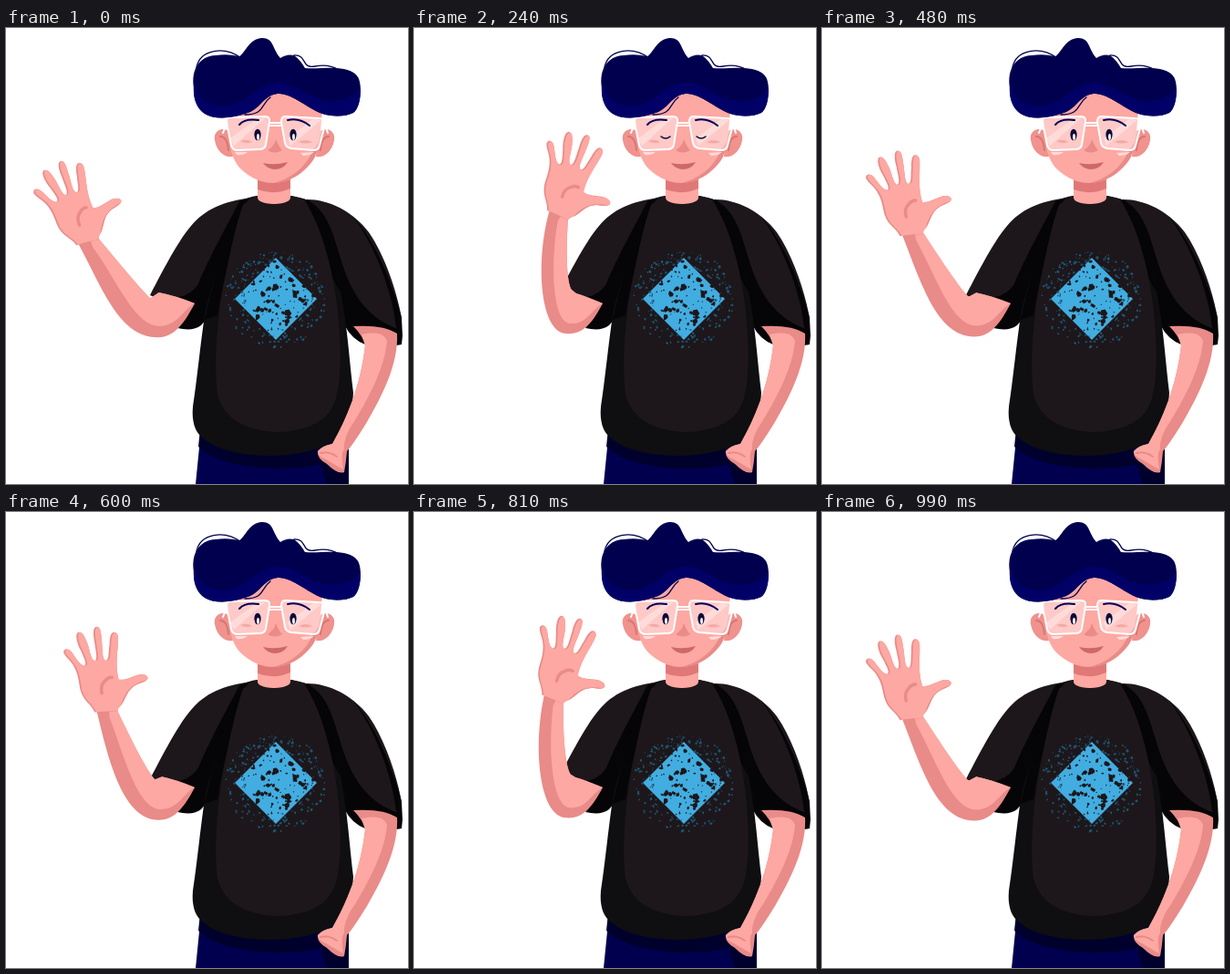
Animation of 441x500 px, one loop 1.02 s. Source, as an HTML page:

```html
<!DOCTYPE html>
<html lang="en">
<head>
<meta charset="utf-8">
<title>Waving</title>
<style>
html, body { margin: 0; width: 100%; height: 100%; overflow: hidden; background: #fff; }
svg { display: block; width: 100vw; height: 100vh; }
.skin { fill: #fda8a2; }
.shade { fill: #e98b88; }
.cloth { fill: #1d171b; }
.dark { fill: #0f0e11; }
.black { fill: #050407; }
.navy { fill: #00004f; }
.line { fill: none; stroke-linecap: round; stroke-linejoin: round; }
</style>
</head>
<body>
<svg viewBox="0 0 441 500">
<defs>
  <path id="palm" d="M108 214C105 204 97 201 95 188C94 178 95 171 90 160C87 154 82 150 81 145
    C82 140 87 141 90 146C94 153 97 161 102 162C106 161 102 152 100 145C97 138 95 127 99 125
    C104 124 106 131 108 138C110 146 110 157 114 158C118 157 116 146 116 138C115 128 116 121 120 121
    C125 121 124 131 124 138C124 146 122 157 126 159C130 159 130 149 132 142C133 134 135 128 139 129
    C144 131 142 138 141 144C139 155 136 167 138 181C146 183 153 179 161 178C167 178 170 180 170 183
    C168 187 161 187 156 189C146 193 144 202 138 209Q133 213 133 216Q121 214 108 214Z"/>
  <clipPath id="palmClip"><use href="#palm"/></clipPath>
</defs>

<!-- trousers -->
<path class="navy" d="M214 440L208 500H376V440Z"/>
<path fill="#00002c" d="M213 440L211 459Q232 480 290 483Q325 484 345 478L352 500H376V440Z"/>

<!-- shirt -->
<path class="cloth" d="M270 186C238 190 218 199 203 217C190 232 175 260 158 293Q166 297 190 306L216 322L262 215Z"/>
<path class="black" d="M270 186L256 190C246 210 225 247 212 278Q206 292 186 296L207 303L188 329Q205 333 214 326L236 300L262 215Z"/>
<path class="cloth" d="M328 188C352 187 380 200 398 224C416 250 429 290 434 318V346Q426 350 414 343Q395 327 371 324L350 240Z"/>
<path class="black" d="M328 188C350 196 358 222 365 246C375 281 389 315 430 330L435 337L434 347Q424 350 412 341L396 348Q379 342 371 325L350 240Z"/>
<path class="black" d="M380 206C405 232 425 283 434 318L435 338L428 328C424 290 405 238 380 206Z"/>
<path class="dark" d="M257 190Q267 185 275 184L313 184Q326 186 333 190C347 212 360 248 367 288C375 330 377 370 381 400Q380 435 356 455Q330 469 288 469Q235 468 214 448Q203 438 205 415C210 383 213 347 219 308C231 266 244 215 257 190Z"/>
<path class="black" d="M257 190L266 187C252 230 238 270 232 315L218 320C231 265 241 218 257 190ZM326 187L334 190C351 215 361 255 367 290L357 272C349 236 341 211 326 187Z"/>
<path class="cloth" d="M266 189L275 184H313L327 188C346 217 359 265 364 310C368 350 368 385 362 406Q352 442 296 443Q242 440 232 402C228 370 231 330 237 291C244 255 251 219 260 194Z"/>
<g id="print"><path fill="#42ade0" d="M296 252L341 297L296 342L251 297Z"/></g>

<!-- neck, ears, face -->
<path class="skin" d="M276 160H312V185Q313 192 294 193Q275 192 276 185Z"/>
<path fill="#df7876" d="M276 162H312V176Q294 184 276 177Z"/>
<path fill="#f0928e" d="M246 114C237 107 227 113 229 123C231 135 240 143 249 141ZM343 114C352 107 362 113 360 123C358 135 349 143 340 141Z"/>
<path class="line" stroke="#d97572" stroke-width="2" d="M235 119Q243 119 244 134M354 119Q346 119 345 134"/>
<path class="skin" d="M243 90C243 124 246 142 257 154Q274 170 293 170Q314 169 329 154C342 140 345 120 347 90L296 66Z"/>
<path class="shade" d="M344 124C341 139 338 146 329 154Q314 169 293 170C318 164 331 148 338 132Z"/>
<path class="shade" d="M296 122Q299 130 303 134Q295 139 287 134Q294 130 296 122Z"/>
<path fill="#cd6868" d="M282 148Q295 151 309 147Q304 155 295 155Q287 155 282 148Z"/>

<!-- glasses -->
<g class="line" stroke="#fff" stroke-width="2">
  <path fill="#fff" fill-opacity=".38" d="M246 98L284 97Q290 97 289 103L285 128Q284 133 278 133L254 134Q248 134 247 128L242 104Q241 98 246 98ZM306 97L343 99Q351 99 350 106L344 129Q343 134 337 134L313 132Q307 131 306 126L302 103Q302 97 306 97Z"/>
  <path d="M289 104H302M289 107H302M242 105L238 115M350 106L353 115"/>
</g>
<path fill="#fff" opacity=".35" d="M246 121L275 100L284 99L250 129ZM309 121L337 100L346 101L312 129Z"/>
<path fill="#fff" opacity=".6" d="M251 136H265Q260 140 253 139ZM323 137L338 136Q334 140 326 140Z"/>
<path class="shade" opacity=".5" d="M257 124Q264 121 270 125Q264 128 257 124ZM321 125Q328 121 336 125Q328 128 321 125Z"/>

<!-- eyes and brows -->
<g id="open"></g>
<path id="closed" class="line" stroke="#0b0a3a" stroke-width="1.5" d="M271 119Q276 123 281 119M310 119Q315 123 320 119"/>
<path class="line" stroke="#00005a" stroke-width="2" d="M256 106Q262 99 277 101M309 101Q322 98 333 107"/>

<!-- hair -->
<path class="navy" d="M206 65C203 47 211 31 230 30Q243 28 256 31C263 27 266 12 281 11C294 11 292 23 301 33Q308 28 316 30Q323 35 328 44C344 45 356 42 371 45Q386 48 388 59C391 73 387 88 381 93C371 98 356 97 347 94C329 87 313 71 298 72C282 74 279 89 265 93C249 99 229 101 218 94Q205 85 206 65Z"/>
<path fill="#000067" d="M206 60C213 85 234 90 252 83C271 76 277 61 298 60C321 60 331 79 356 80Q379 80 388 66C390 78 386 90 381 93C371 98 356 97 347 94C329 87 313 71 298 72C282 74 279 89 265 93C249 99 229 101 218 94Q204 85 206 60Z"/>
<path class="line" stroke="#00004f" stroke-width="1.3" d="M209 43C213 24 239 19 258 33M316 30C331 29 323 45 339 42Q354 39 365 46M262 95C284 95 279 84 290 76"/>

<!-- resting arm -->
<path class="shade" d="M394 348Q392 338 381 327Q414 325 429 335C431 369 411 406 396 432Q380 458 374 464Q373 477 371 487Q364 490 352 478Q341 472 342 464Q347 458 358 456C373 430 389 393 394 348Z"/>
<path class="skin" d="M394 348Q392 342 390 336Q414 331 418 343C416 370 400 402 383 430Q370 448 371 462Q367 465 370 484Q359 478 351 473Q341 469 342 464Q347 458 358 456C373 430 389 393 394 348Z"/>
<path class="line" stroke="#e98b88" stroke-width="2" d="M345 466Q355 464 363 470"/>

<!-- waving arm -->
<path id="armShade" class="shade"/>
<path id="armLight" class="skin"/>
<g id="hand">
  <use href="#palm" class="shade"/>
  <g clip-path="url(#palmClip)">
    <use href="#palm" class="skin" x="1.8"/>
    <path class="line" stroke="#e98b88" stroke-width="4" d="M168 187C153 189 146 196 140 208"/>
  </g>
  <path class="line" stroke="#e98b88" stroke-width="3.5" d="M118 194Q117 185 123 181Q127 177 131 178"/>
</g>
</svg>
<script>
const $ = id => document.getElementById(id);
const clamp = v => Math.max(0, Math.min(1, v));

// Worn shirt print
let seed = 7;
const rnd = () => (seed = seed * 16807 % 2147483647) / 2147483647;
function speck(x, y, size, fill) {
  const pts = [0, 1, 2, 3, 4, 5].map(i => {
    const r = size * (.5 + rnd() * .8);
    return (x + r * Math.cos(i * 1.05)).toFixed(1) + ',' + (y + r * Math.sin(i * 1.05)).toFixed(1);
  });
  return `<polygon points="${pts.join(' ')}" fill="${fill}"/>`;
}
let specks = '';
for (let i = 0; i < 210; i++) {
  const a = rnd() * 6.283, r = 34 + rnd() * 21;
  specks += speck(296 + r * Math.cos(a), 297 + r * Math.sin(a), .5 + rnd() * 1.2, '#1d5673');
}
for (let i = 0; i < 100; i++) {
  const u = rnd() * 62 - 31, v = rnd() * 62 - 31;
  specks += speck(296 + (u - v) * .72, 297 + (u + v) * .72, .7 + rnd() * rnd() * 4, '#1d171b');
}
$('print').innerHTML += specks;

$('open').innerHTML = [276, 315].map(x =>
  `<ellipse cx="${x}" cy="117" rx="3.6" ry="6.3" fill="#0b0a3a"/>
   <ellipse cx="${x + .5}" cy="119.5" rx="1.4" ry="3.4" fill="#fff"/>`).join('');

// Phase, forearm lean, hand turn
const keys = [[0, 44.6, -18], [90, 22, 0], [150, 13, 10], [240, .2, 21],
              [270, 3.4, 19.5], [450, 37.6, -9], [480, 44.6, -18]];
function pose(p) {
  const i = Math.max(1, keys.findIndex(k => k[0] >= p));
  const a = keys[i - 1], b = keys[i], f = (p - a[0]) / (b[0] - a[0]);
  return [a[1] + (b[1] - a[1]) * f, a[2] + (b[2] - a[2]) * f];
}

function draw(t) {
  const phase = t < 270 ? t : t < 510 ? t - 30 : Math.max(0, t - 540);
  const [lean, turn] = pose(phase);
  const rad = lean * Math.PI / 180, c = Math.cos(rad), s = Math.sin(rad), k = lean / 43;
  // Point on the forearm, turned about the elbow
  const at = (x, y) => (160 + x * c + y * s).toFixed(2) + ' ' + (303 - x * s + y * c).toFixed(2);
  const top = `207 302Q188 294 ${178 - 10 * k} ${291 - k}L${173 - 14 * k} ${287 + 9 * k}`;
  const inner = `C${168 - 18 * k} ${280 + 8 * k} ${at(6, -55)} ${at(10, -103)}`;
  $('armShade').setAttribute('d', `M${at(-11, -103)}C${at(-27, -48)} ${138 - 13 * k} ${334 + 5 * k}
    167 ${335 + 4 * k}C185 ${337 + 2 * k} 196 323 ${top}${inner}Z`);
  $('armLight').setAttribute('d', `M${at(9, -101)}Q${at(-2, -98)} ${at(-3, -85)}
    C${at(-10, -42)} ${152 - 10 * k} ${324 + 3 * k} ${172 - 3 * k} ${324 + 3 * k}C190 325 193 310 ${top}${inner}Z`);
  $('hand').setAttribute('transform', `translate(${at(0, -102)}) rotate(${turn}) translate(-121 -210)`);

  const lid = clamp((Math.abs(t - 270) - 30) / 60);
  $('open').setAttribute('transform', `translate(0 ${119 * (1 - lid)}) scale(1 ${lid})`);
  $('closed').setAttribute('visibility', lid ? 'hidden' : 'visible');
}

function tick() {
  draw(Math.floor(performance.now() % 1020 / 30) * 30);
  requestAnimationFrame(tick);
}
tick();
</script>
</body>
</html>
```
